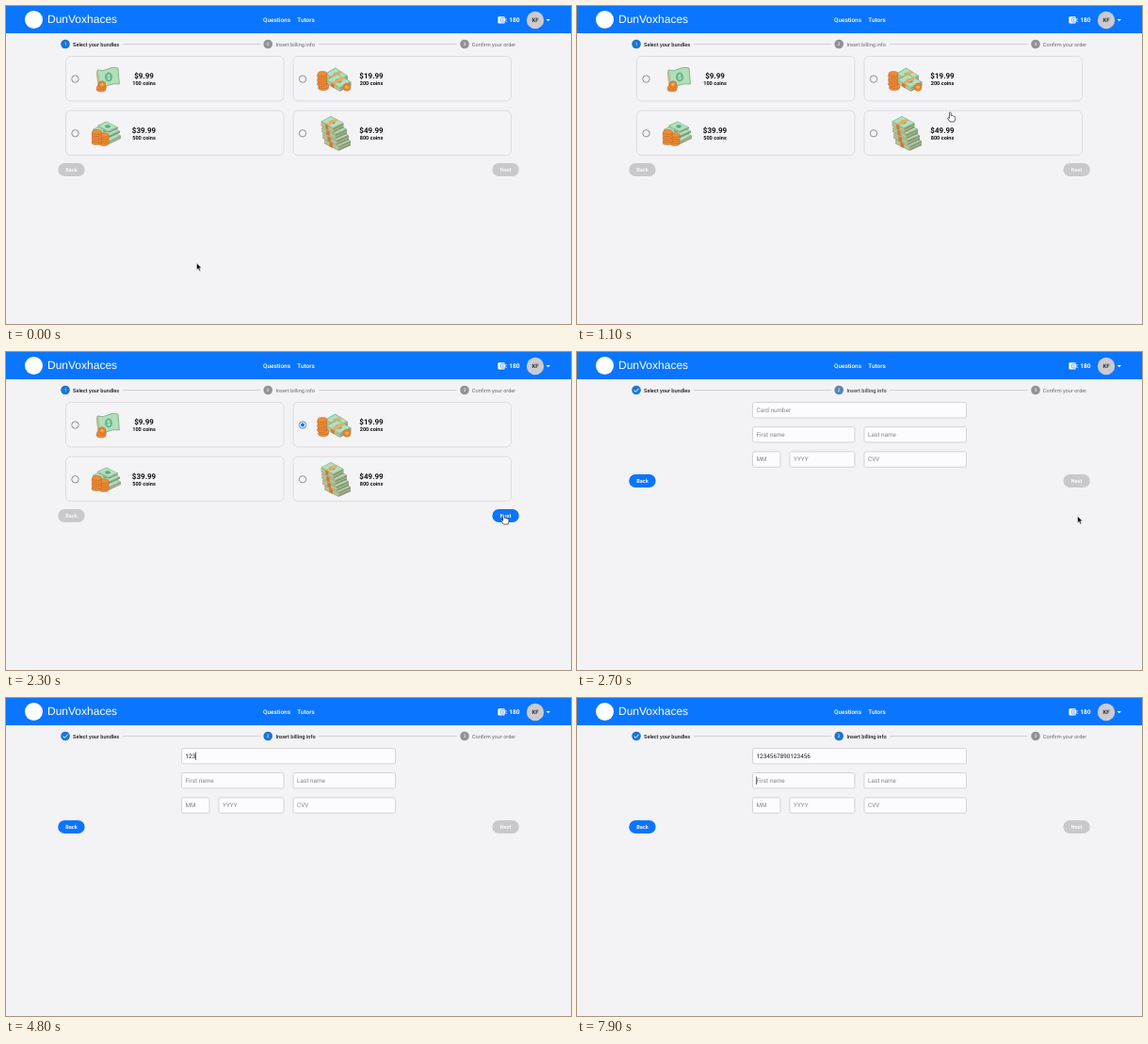
An HTML page that plays this animation: 600 px wide and 338 px high, repeating every 8 s.

```html
<!DOCTYPE html>
<html lang="en">
<head>
<meta charset="utf-8">
<title>Buy coins</title>
<style>
  html, body { margin: 0; width: 100%; height: 100%; overflow: hidden; background: #f3f2f5; }
  svg { display: block; width: 100vw; height: 100vh; }
  text { font-family: Roboto, sans-serif; font-size: 6.4px; text-rendering: geometricPrecision; white-space: pre; }
</style>
</head>
<body>
<svg id="stage" viewBox="0 0 600 338"></svg>
<script>
const BLUE = '#0a75fe', STEP_BLUE = '#1976d2', GREY = '#c9c8cb', INK = '#1d1c1e';
const LOOP = 8000, SELECT = 1700, SUBMIT = 2600;
const stage = document.getElementById('stage');

// Markup helpers
const text = (x, y, s, a = '') => `<text x="${x}" y="${y}" ${a}>${s}</text>`;
const rect = (x, y, w, h, r, a) => `<rect x="${x}" y="${y}" width="${w}" height="${h}" rx="${r}" ${a}/>`;
const circle = (x, y, r, a) => `<circle cx="${x}" cy="${y}" r="${r}" ${a}/>`;
const path = (d, a) => `<path d="${d}" ${a}/>`;
const group = (id, s) => `<g id="${id}">${s}</g>`;
const bold = (size, fill) => `text-anchor="middle" font-weight="700" style="font-size:${size}px" fill="${fill}"`;

function button(id, x, y, label, fill) {
  return rect(x, y, 28.4, 14, 7, `id="${id}" fill="${fill}"`) +
    text(x + 14.2, y + 9, label, bold(5.6, '#f8f7fa'));
}

function header() {
  return rect(0, 0, 600, 29, 0, `fill="${BLUE}"`) +
    circle(29.5, 14.5, 9.5, 'fill="#fff"') +
    text(44, 18.3, 'DunVoxhaces', 'fill="#fff" style="font:12px \'Liberation Sans\',sans-serif"') +
    text(273, 17.3, 'Questions', 'fill="#fff" font-weight="500"') +
    text(309.3, 17.3, 'Tutors', 'fill="#fff" font-weight="500"') +
    rect(522.4, 11.2, 7.4, 7.4, 1, 'fill="#fff"') +
    rect(525.6, 12.8, 5.2, 4.2, .7, `fill="#fff" stroke="${BLUE}" stroke-width=".6"`) +
    circle(527.8, 14.9, .7, `fill="${BLUE}"`) +
    text(530.8, 17.3, ': 180', 'fill="#fff" font-weight="700" style="font-size:6.6px"') +
    circle(562, 15, 9.2, 'fill="#cbcad0"') +
    text(562, 17.2, 'KF', bold(6, '#333338')) +
    path('M573.6 14h4.4l-2.2 2.3z', 'fill="#fff"');
}

function step(n, x, labelX, label) {
  const on = n === 1;
  return circle(x, 40.5, 4.8, `id="dot${n}" fill="${on ? STEP_BLUE : '#929195'}"`) +
    text(x, 42.2, n, `id="num${n}" text-anchor="middle" fill="#fff" style="font-size:4.8px"`) +
    text(labelX, 42.6, label, `id="label${n}" font-weight="${on ? 500 : 400}" style="font-size:5.6px" fill="${on ? INK : '#6a696c'}"`);
}

function stepper() {
  return step(1, 63, 71, 'Select your bundles') + step(2, 278.2, 286.4, 'Insert billing info') +
    step(3, 487, 494.8, 'Confirm your order') +
    path('M60.6 40.6l1.7 1.8 3.2-3.6', 'id="tick" fill="none" stroke="#fff" stroke-width="1"') +
    path('M124 40.6H270.2M332 40.6H478.6', 'stroke="#b9b8bc" stroke-width=".6"');
}

// Money pictures
const GOLD = 'fill="#ee8d37" stroke="#b45c1d" stroke-width=".5"';

function coins(x, y, n, r) {
  let s = '';
  for (let i = 0; i < n; i++)
    s += `<ellipse cx="${x + (i % 2) * .5}" cy="${y - i * 2.2}" rx="${r}" ry="${r * .5}" ${GOLD}/>`;
  return s;
}

function coin(x, y, r) {
  return circle(x, y, r, GOLD) + circle(x, y, r * .55, 'fill="#f6ad55" stroke="#c9691f" stroke-width=".5"');
}

function bundle(x, y, w, h, t, banded = true) {
  const A = [0, .42 * h], B = [.44 * w, 0], C = [w, .56 * h], D = [.54 * w, h];
  const mix = (p, q, k) => [p[0] + (q[0] - p[0]) * k, p[1] + (q[1] - p[1]) * k];
  const down = p => [p[0], p[1] + t];
  const face = (pts, fill) => `<polygon points="${pts.map(p => p.map(v => v.toFixed(1))).join(' ')}" fill="${fill}"/>`;
  const a = mix(A, D, .36), b = mix(B, C, .36), c = mix(B, C, .6), d = mix(A, D, .6);
  let s = face([A, D, down(D), down(A)], '#a9b58c') + face([D, C, down(C), down(D)], '#87956f') +
    face([A, B, C, D], '#79bd93') +
    face([mix(A, C, .06), mix(B, D, .06), mix(C, A, .06), mix(D, B, .06)], '#b5dfbd');
  s += `<ellipse cx="${w * .5}" cy="${h * .5}" rx="${w * .13}" ry="${h * .15}" fill="#55a87e"/>`;
  if (t > 2) s += path(`M0 ${A[1] + t / 2}L${D[0]} ${h + t / 2}L${w} ${C[1] + t / 2}`, 'fill="none" stroke="#dcd8b4" stroke-width=".6"');
  if (banded) s += face([a, b, c, d], '#e9ac68') + face([a, d, down(d), down(a)], '#c97b3b');
  return `<g transform="translate(${x} ${y})">${s}</g>`;
}

const pictures = [
  path('M97 68q6 2 11 -1t11 -1l1.400 17q-6 -1 -11 1t-10 1z', 'fill="#b2deb9" stroke="#76a77f" stroke-width=".8"') +
    path('M97 68l-1.300 3 2 16 2-2z', 'fill="#c3b98c"') +
    `<ellipse cx="109" cy="75.500" rx="4" ry="5" fill="#62b78c"/>` +
    text(109, 78.2, '$', bold(7, '#d7efd9')) +
    coins(101, 88.5, 2, 5) + coin(102, 83.5, 3.8),
  bundle(339, 65.5, 24, 15, 4) + bundle(340, 72, 26.5, 15, 4) +
    coins(337, 87, 2, 5.5) + coins(335.5, 83, 6, 5) + coin(362, 86.3, 4),
  bundle(94, 130, 28, 14, 3, false) + bundle(92, 125, 29, 14, 2, false) + bundle(97, 122.5, 22, 11, 1.5, false) +
    coins(104, 146, 5, 5) + coins(96, 145, 6, 5),
  bundle(338, 136, 28, 13, 5) + bundle(336, 130, 28, 13, 5) + bundle(335, 123.500, 27, 13, 5) + bundle(334.5, 117, 24, 13, 5)
];

function card(i, price, amount) {
  const x = i % 2 ? 305 : 63.5, y = i > 1 ? 111.2 : 53.5, mid = x + 83;
  return rect(x, y, 231.5, 47.400, 5, 'fill="#f4f3f6" stroke="#d3d2d6" stroke-width=".7"') +
    circle(x + 10, y + 24.1, 3.7, `${i === 1 ? 'id="radio" ' : ''}fill="none" stroke="#77767a" stroke-width=".8"`) +
    pictures[i] +
    text(mid, y + 23.7, price, bold(8, '#111')) + text(mid, y + 30.8, amount, bold(5.6, '#111'));
}

function field(x, y, w, label, id = '') {
  return rect(x, y, w, 16.4, 1.8, 'fill="#fcfbfd" stroke="#c5c4c8" stroke-width=".7"') +
    text(x + 4, y + 10.5, label, `${id && `id="${id}"`} fill="#858488"`);
}

stage.innerHTML = rect(0, 0, 600, 338, 0, 'fill="#f3f2f5"') + header() + stepper() +
  group('bundles',
    card(0, '$9.99', '100 coins') + card(1, '$19.99', '200 coins') +
    card(2, '$39.99', '500 coins') + card(3, '$49.99', '800 coins') +
    circle(315, 77.6, 2, `id="chosen" fill="${STEP_BLUE}"`) +
    button('back1', 55.2, 167, 'Back', GREY) + button('next1', 516.400, 167, 'Next', GREY)) +
  group('billing',
    field(186.5, 53.5, 227, 'Card number', 'number') +
    field(186.5, 79.6, 108.5, 'First name') + field(305, 79.6, 108.5, 'Last name') +
    field(186.5, 105.9, 29.5, 'MM') + field(226, 105.9, 69, 'YYYY') + field(305, 105.9, 108.5, 'CVV') +
    button('back2', 55.2, 130, 'Back', BLUE) + button('next2', 516.400, 130, 'Next', GREY) +
    rect(0, 0, .6, 8.6, 0, 'id="caret" fill="#111"')) +
  group('pointer',
    path('M0 0V7.300L1.700 5.700 2.900 8.400 4.100 7.900 2.900 5.300H5.200Z', 'id="arrow" fill="#000" stroke="#fff" stroke-width=".5"') +
    path('M-.9 .8Q0 -.5 .9 .8V3.800Q1.900 3.200 2.500 4.100 3.600 3.600 4 4.600 5.100 4.300 5.300 5.500V7.700L4.300 10.300H-.3L-2.900 6.600Q-2.600 5.200 -.9 6.500Z',
      'id="hand" fill="#fff" stroke="#222" stroke-width=".7"') +
    path('M-1.700 -4.500Q0 -4.500 0 -3.500Q0 -4.500 1.700 -4.500M0 -3.500V3.500M-1.700 4.500Q0 4.500 0 3.500Q0 4.500 1.700 4.500',
      'id="beam" fill="none" stroke="#222" stroke-width=".7"'));

const el = {};
stage.querySelectorAll('[id]').forEach(n => el[n.id] = n);
const show = (id, on) => el[id].setAttribute('visibility', on ? 'inherit' : 'hidden');
const set = (id, name, value) => el[id].setAttribute(name, value);

// time, x, y of the pointer tip
const route = [[0, 202.5, 273.3], [100, 202.5, 273.3], [700, 394.8, 118], [1000, 396, 114],
  [1600, 400.3, 97.6], [1800, 400.3, 97.6], [2350, 531.6, 174.5], [2850, 531.6, 174.5],
  [3550, 313.5, 64.300], [LOOP, 313.5, 64.300]];
const keyTimes = [4500, 4600, 4800, 4900, 5100, 5300, 5500, 5700, 5900, 6100, 6400, 6600, 7000, 7200, 7500, 7700];
const FOCUS = 3900, BLINK = 4300, NEXT_FIELD = 7850;
const digits = '1234567890123456';

function pointerAt(t) {
  const i = route.findIndex((p, k) => t < route[k + 1][0]);
  const [t0, x0, y0] = route[i], [t1, x1, y1] = route[i + 1];
  const u = (t - t0) / (t1 - t0), k = u * u * (3 - 2 * u);
  return [x0 + (x1 - x0) * k, y0 + (y1 - y0) * k];
}

function pointerKind(x, y, paid) {
  const inside = (l, t, r, b) => x > l && x < r && y > t && y < b;
  if (paid) return inside(186, 53, 414, 70) || inside(305, 79, 414, 96) || inside(305, 106, 414, 122) ? 'beam' : 'arrow';
  const onCard = [63, 305].some(l => [53, 111].some(t => inside(l, t, l + 232, t + 48)));
  return onCard || inside(516, 167, 545, 181) ? 'hand' : 'arrow';
}

function blend(from, to, k) {
  return `rgb(${from.map((v, i) => Math.round(v + (to[i] - v) * k))})`;
}

function render(t) {
  const paid = t >= SUBMIT, chosen = t >= SELECT;
  show('bundles', !paid);
  show('billing', paid);
  show('tick', paid);
  show('num1', !paid);
  show('chosen', chosen && !paid);
  set('radio', 'stroke', chosen ? STEP_BLUE : '#77767a');
  set('next1', 'fill', chosen ? BLUE : GREY);

  const fade = Math.min(1, Math.max(0, (t - SUBMIT) / 220));
  set('dot2', 'fill', blend([146, 145, 149], [25, 118, 210], fade));
  set('label2', 'fill', blend([106, 105, 108], [29, 28, 30], fade));
  set('label2', 'font-weight', paid ? 500 : 400);

  const typed = keyTimes.filter(k => t >= k).length;
  el.number.textContent = typed ? digits.slice(0, typed) : 'Card number';
  set('number', 'fill', typed ? INK : '#858488');
  const moved = t >= NEXT_FIELD;
  const offset = typed && !moved ? el.number.getComputedTextLength() : 0;
  set('caret', 'x', 190.4 + offset);
  set('caret', 'y', moved ? 83.4 : 57.4);
  show('caret', paid && t >= FOCUS && (t < BLINK || typed));

  const [x, y] = pointerAt(t), kind = pointerKind(x, y, paid);
  set('pointer', 'transform', `translate(${x.toFixed(2)} ${y.toFixed(2)})`);
  ['arrow', 'hand', 'beam'].forEach(id => show(id, id === kind));
  show('pointer', !typed);
}

const start = performance.now();
function tick() {
  render((performance.now() - start) % LOOP);
  requestAnimationFrame(tick);
}
tick();
</script>
</body>
</html>
```
